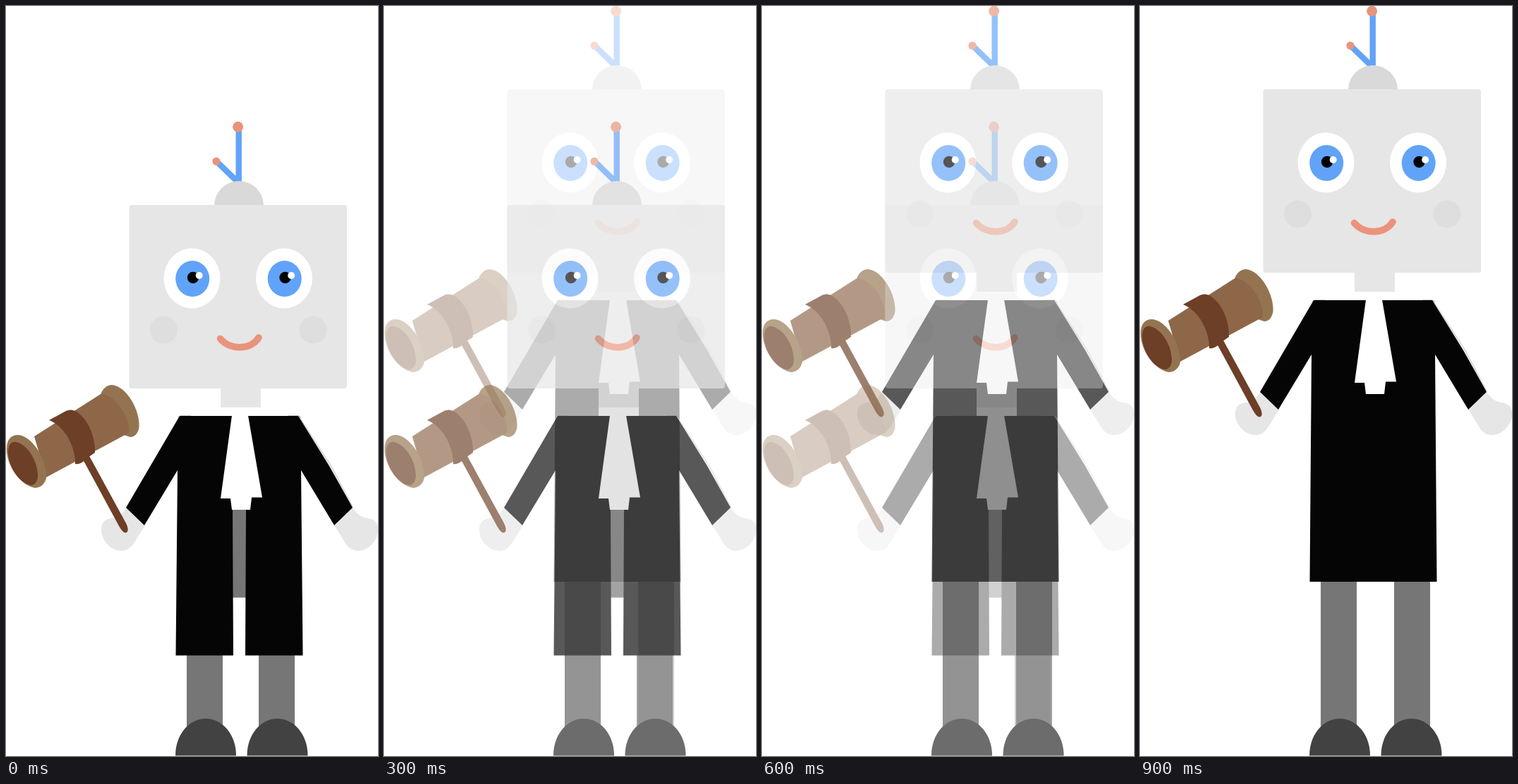
These frames come from a looping animation (527x1063 px, 1000 ms). An HTML page:

```html
<!DOCTYPE html>
<html lang="en">
<head>
<meta charset="utf-8">
<title>Robot judge</title>
<style>
html, body { margin: 0; width: 100%; height: 100%; overflow: hidden; background: #fff; }
svg { display: block; width: 100vw; height: 100vh; }
</style>
</head>
<body>
<svg viewBox="0 0 527 1063">
  <defs>
    <g id="eye">
      <ellipse cx="263.5" cy="386" rx="40" ry="42.5" fill="#fff"/>
      <ellipse cx="264.2" cy="386.5" rx="24" ry="25.5" fill="#61a3f9"/>
      <circle cx="265" cy="385" r="8.2"/>
      <circle cx="273.7" cy="382" r="5" fill="#fff"/>
    </g>
    <path id="hand" fill="#e6e6e6" d="M171 711C166 718 160 725 150 726C138 727 134 735 135 745C137 761 151 773 166 772C176 771 181 762 185 755L197 736Z"/>
    <path id="shoe" fill="#424242" d="M240 1062.5C240 1032 260 1010 283 1010S326 1032 326 1062.5Z"/>

    <g id="head">
      <path d="M329.7 171V250M298 220L328 249" stroke="#61a3f9" stroke-width="8.4" fill="none"/>
      <circle cx="328.6" cy="171.2" r="7.5" fill="#e8937c"/>
      <circle cx="298" cy="220.2" r="5.6" fill="#e8937c"/>
      <path d="M295 283A35 35 0 0 1 365 283Z" fill="#d9d9d9"/>
      <rect x="304" y="540" width="57" height="29" fill="#e6e6e6"/>
      <rect x="304" y="569" width="57" height="12" fill="#fff"/>
      <rect x="174.5" y="282" width="308.5" height="260" rx="4" fill="#e6e6e6"/>
      <use href="#eye"/>
      <use href="#eye" x="130.5"/>
      <circle cx="223.5" cy="459" r="19.5" fill="#dedede"/>
      <circle cx="435" cy="459" r="19.5" fill="#dedede"/>
      <path d="M303.5 471.5C317 488 347 488 358 470" stroke="#ea937c" stroke-width="9.6" stroke-linecap="round" fill="none"/>
    </g>

    <g id="arms">
      <use href="#hand"/>
      <use href="#hand" transform="matrix(-1 0 0 1 662 0)"/>
      <path d="M415 582L460.500 652L491 710" stroke="#d9d9d9" stroke-width="2" fill="none"/>
      <path fill="#050505" d="M246 581H300V658H243L196 736L170 711Z"/>
      <path fill="#050505" d="M360 581H414L458 652L491 711L465 736L418 658H360Z"/>
      <path d="M244 583L247 581H262M400 581H415L418 584" stroke="#777" stroke-width=".8" fill="none"/>
    </g>

    <path id="jabot" fill="#fff" d="M320 580.500H343L363 696.500H348L346 714H320L318 698H304Z"/>

    <g id="gavel">
      <path fill="#6c3f26" d="M108 641L117 636L170 733C173 739 174 745 170 746.500C166 747 163 742 160 737Z"/>
      <path fill="#947450" d="M134.500 549C138 541 144 537 150 537C171 539 190 573 188.500 597C187 606 182 611 176 611L167 608Z"/>
      <path fill="#8d6748" d="M40 610L135 549.500C156 553 175 580 174 605L57 668Z"/>
      <path fill="#6c3f26" d="M61 587L85 574C90 572 94 572 98 574C116 584 127 611 126 633L113 642C108 648 103 650 98 649C99 626 84 596 61 587Z"/>
      <path fill="#947450" d="M1 627C1 614 8 608 16 608C36 608 58 641 57 669C55 678 48 683 41 683C20 680 0 650 1 627Z"/>
      <path fill="#6c3f26" d="M3 632C3 621 9 617 14 618C30 621 46 645 45 668C44 676 39 680 34 679C17 675 3 651 3 632Z"/>
    </g>
  </defs>

  <rect width="527" height="1063" fill="#fff"/>

  <g id="tall" opacity="0">
    <path d="M256 810H307V1040H256ZM360 810H411V1040H360Z" fill="#767676"/>
    <use href="#shoe"/>
    <use href="#shoe" x="101.500"/>
    <g transform="translate(0 -164)">
      <use href="#arms"/>
      <path fill="#050505" d="M246 581H414L418 658L420.500 980H240.500L243 658Z"/>
      <use href="#jabot"/>
      <use href="#head"/>
      <use href="#gavel"/>
    </g>
  </g>

  <g id="short">
    <path d="M256 910H307V1040H256ZM358 910H409V1040H358ZM320 700H341V838.500H320Z" fill="#767676"/>
    <use href="#shoe"/>
    <use href="#shoe" x="101.500"/>
    <use href="#arms"/>
    <path fill="#050505" d="M246 581H321V714L322 920.500H240.500L243 658Z"/>
    <path fill="#050505" d="M343 581H414L418 658L420.500 920.500H339L340 714V620Z"/>
    <use href="#jabot"/>
    <use href="#head"/>
    <use href="#gavel"/>
  </g>
</svg>
<script>
const LOOP = 1000, STEP = 100, LAST = 9;
const tall = document.getElementById("tall");
const short = document.getElementById("short");

// Stepped cross-fade from the crouched pose to the raised one
function draw(ms) {
  const k = Math.floor((ms % LOOP) / STEP) / LAST;
  tall.setAttribute("opacity", k);
  short.setAttribute("opacity", 1 - k);
}

let start;
function tick(now) {
  start ??= now;
  draw(Math.max(0, now - start));
  requestAnimationFrame(tick);
}
draw(0);
requestAnimationFrame(tick);
</script>
</body>
</html>
```
